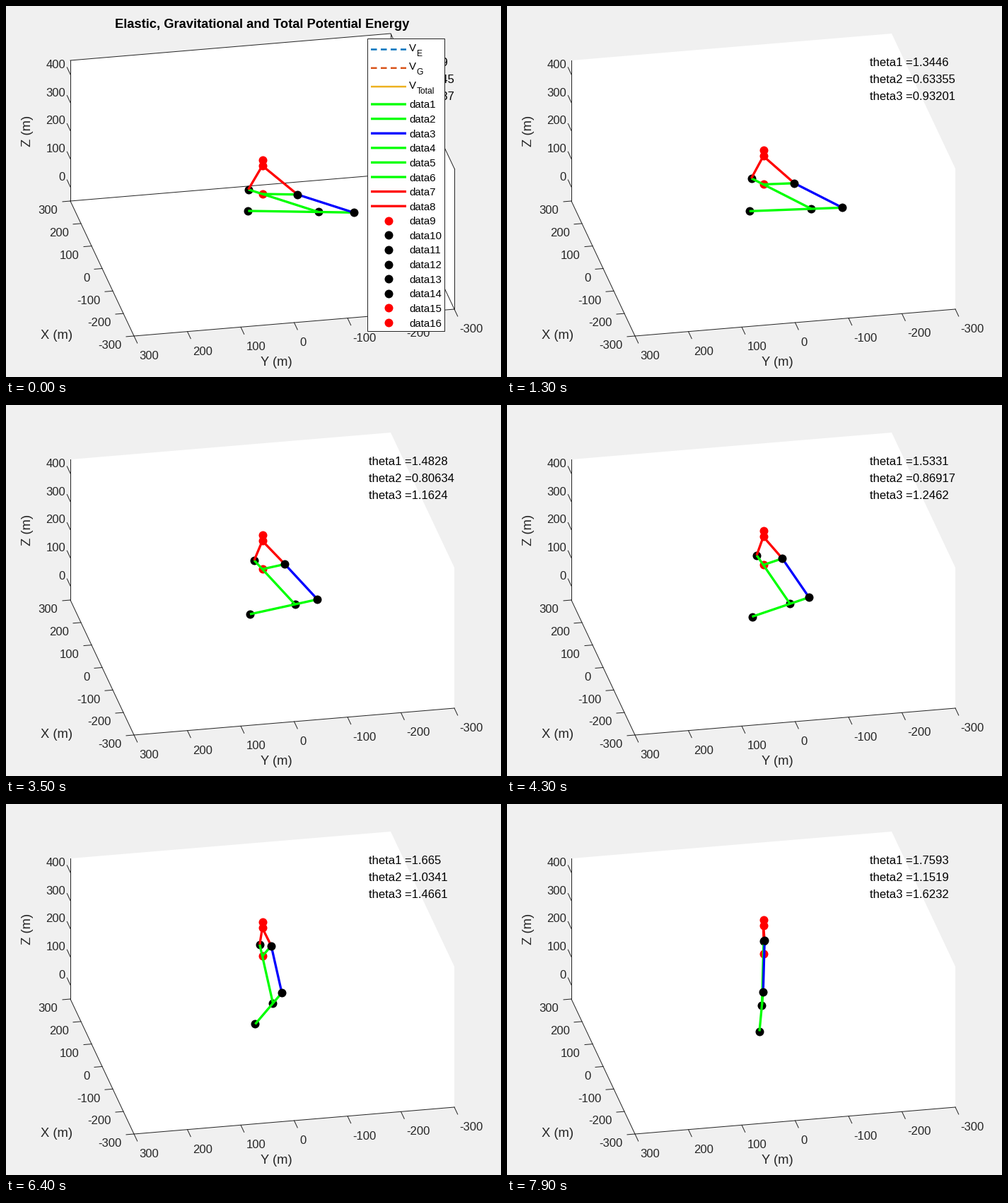
A matplotlib script for the animation above (8 s loop, 700 by 525 pixels).

```python
import numpy as np
import matplotlib.pyplot as plt
from matplotlib.animation import FuncAnimation

plt.rcParams["font.family"] = "Liberation Sans"
PX = 0.72  # points per pixel at 100 dpi
FRAMES = 80
INK = "#262626"
GREEN, BLUE, RED = "#00ff00", "#0000ff", "#ff0000"

fig = plt.figure(figsize=(7, 5.25), dpi=100, facecolor="#f0f0f0")
ax = fig.add_axes([0, 0, 1, 1])
ax.set_xlim(0, 700)
ax.set_ylim(525, 0)
ax.axis("off")


def line(pts, color=INK, width=1.0, z=1, **kw):
    x, y = zip(*pts)
    return ax.plot(x, y, color=color, lw=width * PX, zorder=z, **kw)[0]


def bar(pts, color, width, z, **kw):
    return line(pts, color, width, z, solid_capstyle="butt", snap=False, **kw)


def text(x, y, s, size=16.67, ha="left", color=INK, z=2, **kw):
    return ax.text(x, y, s, fontsize=size * PX, ha=ha, va="baseline",
                   color=color, zorder=z, **kw)


def dot(x, y, color, z):
    return ax.plot([x], [y], "o", color=color, ms=12 * PX, mew=0, zorder=z,
                   snap=False)[0]


# Axes box corners in the projected view
top_left, top_back, top_right = (91, 77), (544, 39), (634, 230)
left, front, right, back = (91, 276), (181, 467), (634, 429), (544, 238)

ax.fill(*zip(top_left, top_back, top_right, right, front, left),
        color="white", lw=0, zorder=0)
line([top_left, left])
line([left, front, right])

for k in range(7):
    value = 300 - 100 * k
    x, y = 91 + 15 * k, 276 + 31.83 * k
    line([(x, y), (x - 11, y + 0.9)])
    text(x - 17.5, y + 18.3, value, ha="right")
    x, y = 181 + 75.5 * k, 467 - 6.33 * k
    line([(x, y), (x + 4.7, y + 10)])
    text(x + 7.5, y + 33, value)
for k in range(5):
    y = 256 - 39.8 * k
    line([(91, y), (86.3, y - 10)])
    text(84, y - 9, 100 * k, ha="right")

text(72, 471, "X (m)", 18.33, "center")
text(382, 509, "Y (m)", 18.33, "center")
text(35, 177, "Z (m)", 18.33, "center", rotation=90, rotation_mode="anchor")

# Parts seen only in the opening frame
intro = [
    line([top_left, top_back, top_right]),
    line([top_right, right]),
    line([left, back, right]),
    line([top_back, back]),
    text(362.5, 31, "Elastic, Gravitational and Total Potential Energy",
         18.33, "center", "black", weight="bold"),
]


def build_legend():
    items = [ax.add_patch(plt.Rectangle((511, 46), 109, 414, fc="white",
                                        ec=INK, lw=PX, zorder=20))]
    energy = [("E", "#0072bd", True), ("G", "#d95319", True),
              ("Total", "#edb120", False)]
    for k, (sub, color, dashed) in enumerate(energy):
        y = 61.5 + 26.3 * k
        style = dict(dashes=(8.5 / 2.5, 5.5 / 2.5)) if dashed else {}
        items += [
            bar([(516, y), (566, y)], color, 2.5, 21,
                dash_capstyle="butt", **style),
            text(570, y + 2.5, "V", 15, color="black", z=21),
            text(580.5, y + 9.5, sub, 12, color="black", z=21),
        ]
    colors = [GREEN] * 2 + [BLUE] + [GREEN] * 3 + [RED] * 3 + ["black"] * 5 + [RED] * 2
    for k, color in enumerate(colors):
        y = 139 + 20.6 * k
        if k < 8:
            items.append(bar([(516, y), (566, y)], color, 3.3, 21))
        else:
            items.append(dot(541, y, color, 21))
        items.append(text(570, y + 5.5, f"data{k + 1}", 15, color="black", z=21))
    return items


intro += build_legend()

# Smooth motion through a few poses: shoulder height, upper arm, forearm
poses = np.array([0, 13, 22, 35, 52, 64, 79]) / 79
curves = [np.polyfit(poses, v, 4) for v in (
    [266, 252.5, 243.5, 232.3, 220.8, 215.4, 212],
    [79.3, 68, 59.2, 46.2, 28.1, 15, -2],
    [25.5, 34.5, 41, 49.8, 60.3, 66.6, 72.5],
    [99.4, 87.6, 78.5, 63.5, 42, 25, 3.5],
    [1.5, -3.2, -7.5, -14, -23, -29.6, -37],
)]


def joints(i):
    h, px, py, qx, qy = (np.polyval(c, i / 79) for c in curves)
    hip, arm, fore = np.array([362.5, h]), np.array([px, py]), np.array([qx, qy])
    elbow = hip + arm
    return {
        "hip": hip, "low": hip - (0, 40), "high": hip - (0, 48),
        "tail": hip - arm / 4, "crank": hip + fore / 2,
        "elbow": elbow, "knob": elbow + fore / 2, "hand": elbow - fore,
    }


bars = {pair: bar([(0, 0), (1, 1)], color, 3.3, z)
        for pair, color, z in [
            (("tail", "elbow"), GREEN, 6), (("hip", "crank"), GREEN, 6),
            (("hand", "knob"), GREEN, 6), (("crank", "knob"), BLUE, 7),
            (("low", "tail"), RED, 7), (("low", "crank"), RED, 7)]}
dots = {name: dot(0, 0, RED if name in ("hip", "low", "high") else "black",
                  8 if name in ("crank", "knob") else 5)
        for name in joints(0)}
readouts = [text(513, 85 + 24 * k, "", color="black", z=4) for k in range(3)]


def draw(i):
    pos = joints(i)
    for (a, b), link in bars.items():
        link.set_data(*zip(pos[a], pos[b]))
    for name, d in dots.items():
        d.set_data(*pos[name].reshape(2, 1))
    step = (76 + i) * np.pi
    angles = np.pi / 4 + step / 500, -np.pi / 48 + step / 400, step / 300
    for k, (label, angle) in enumerate(zip(readouts, angles), 1):
        label.set_text(f"theta{k} ={angle:.5g}")
    for item in intro:
        item.set_visible(i == 0)
    return []


anim = FuncAnimation(fig, draw, frames=FRAMES, interval=100, repeat=True,
                     repeat_delay=0, blit=False)
plt.show()
```
